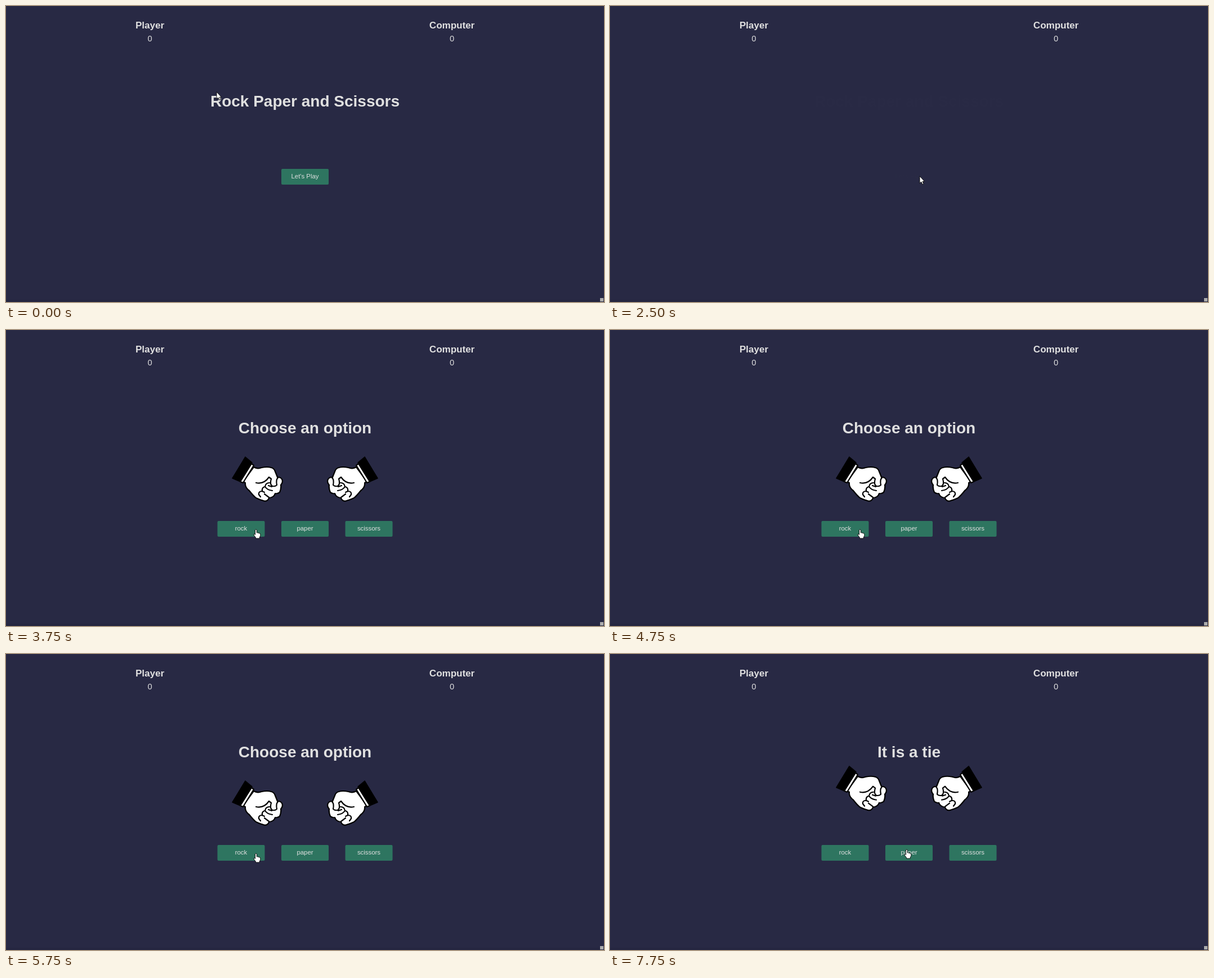
Recreate the animation shown at these times as an HTML page. Size 1062 by 527 pixels, loop 8 s.

```html
<!DOCTYPE html>
<html lang="en">
<head>
<meta charset="utf-8">
<title>Rock Paper and Scissors</title>
<style>
  html, body { margin: 0; height: 100%; overflow: hidden; background: #282944; }
  svg { display: block; width: 100vw; height: 100vh; }
  text { font-family: "Liberation Sans", Arial, sans-serif; fill: #e0e0e0; text-anchor: middle; }
  .name { font-size: 17px; font-weight: bold; }
  .score { font-size: 14.5px; }
  .title { font-size: 28px; font-weight: bold; }
  .button rect { fill: #2e7560; }
  .button text { font-size: 11.4px; }
  .ink { stroke: #000; stroke-width: 2.2; stroke-linecap: round; stroke-linejoin: round; }
  .cursor { fill: #fff; stroke: #000; stroke-width: .9; stroke-linejoin: round; }
</style>
</head>
<body>
<svg viewBox="0 0 1062 527">
  <defs>
    <g id="fist" class="ink" fill="none">
      <path fill="#fff" d="M440 244Q446 248 454 245Q464 243 471 245Q476 246 478 252L482 262Q489 262 490.500 267Q492 272 488 276Q489 282 486 289Q482 292 478 291Q476 298 467 299Q465 305 459 304.500Q450 302 444 299Q439 295 432 286Q424 280 425 272L421 270Z"/>
      <path fill="#fff" d="M436 238L440 241L421 272L416 270Z"/>
      <path fill="#000" stroke-width="1.500" d="M425 226L437 236L416 270L402 264Z"/>
      <path d="M444 272Q458 275 467 262L471 265Q468 275 473 278Q478 279 481 276Q479 266 483 263"/>
      <path d="M468 272Q461 272 460 279Q464 285 473 286M460 279Q454 280 455 287Q448 287 449 293L452 297M455 287L459 289M459 292L467 298M466 277L472 279"/>
    </g>
  </defs>

  <rect y="523" width="1062" height="4" fill="#252640"/>
  <rect x="1055" y="520" width="6" height="6" fill="#adadad"/>

  <text class="name" x="255.500" y="40">Player</text>
  <text class="score" x="255.500" y="63">0</text>
  <text class="name" x="792" y="40">Computer</text>
  <text class="score" x="792" y="63">0</text>

  <g id="intro">
    <text class="title" x="531" y="179">Rock Paper and Scissors</text>
  </g>
  <g id="match">
    <text class="title" id="result" x="531" y="183.500"></text>
    <g id="hands">
      <use href="#fist"/>
      <use href="#fist" transform="translate(1062) scale(-1 1)"/>
    </g>
  </g>

  <g id="cursor" class="cursor">
    <path id="arrow" d="M0 0V12.500L2.800 10L4.800 14.500L6.900 13.600L5 9.300H8.600Z"/>
    <path id="pointer" d="M-1.500 1Q0 -1 1.300 1V6Q3 5 3.800 6.500Q5.500 5.700 6 7.200Q7.800 6.800 7.800 8.500V11.500L6.300 14V16H-.500V14.500L-4 10Q-4.500 7.500 -2.500 8.500L-1.500 9.500Z"/>
  </g>
</svg>
<script>
const LOOP = 8000, STEP = 250;
const FADE = 500, PLAY_CLICK = 2030;
const SHAKE = 2000, LIFT = 26.7;
const ROCK_CLICK = 4250, PAPER_CLICK = 7500, RESULT = 6500;
const SHAKE_STOPS = [0, .15, .25, .35, .5, .65, .75, .85, 1];
const OPTIONS = { rock: 417.5, paper: 531, scissors: 644.5 };

// Pointer route: time, x, y
const ROUTE = [
  [0, 374, 153], [250, 290, 130], [500, 420, 68], [750, 707, 150],
  [1000, 620, 260], [1250, 530, 289], [1500, 542, 298], [1750, 548, 301],
  [2000, 550, 303], [2750, 550, 303], [3000, 530, 316], [3250, 482, 341],
  [3500, 449, 358], [3750, 444, 355], [6750, 444, 355], [7000, 462, 352],
  [7250, 510, 349], [7500, 527, 348], [LOOP, 527, 348]
];

const $ = id => document.getElementById(id);
const clamp = v => Math.min(1, Math.max(0, v));

function addButton(parent, label, x, y) {
  parent.insertAdjacentHTML('beforeend', `<g class="button">
    <rect x="${x - 42}" y="${y}" width="84" height="28" rx="2"/>
    <text x="${x}" y="${y + 17.3}">${label}</text></g>`);
}

// The CSS "ease" curve, cubic-bezier(.25, .1, .25, 1)
function ease(progress) {
  const x = clamp(progress);
  let low = 0, high = 1;
  for (let i = 0; i < 24; i++) {
    const s = (low + high) / 2;
    if (.75 * s * (1 - s) + s ** 3 < x) low = s; else high = s;
  }
  return .3 * low * (1 - low) ** 2 + 3 * low * low * (1 - low) + low ** 3;
}

function shakeOffset(elapsed) {
  const p = elapsed / SHAKE;
  if (p <= 0 || p >= 1) return 0;
  const i = SHAKE_STOPS.findIndex(stop => stop > p) - 1;
  const e = ease((p - SHAKE_STOPS[i]) / (SHAKE_STOPS[i + 1] - SHAKE_STOPS[i]));
  return -LIFT * (i % 2 ? 1 - e : e);
}

function pointerAt(t) {
  const i = ROUTE.findIndex(([time]) => time > t);
  const [t0, x0, y0] = ROUTE[i - 1], [t1, x1, y1] = ROUTE[i];
  const k = (t - t0) / (t1 - t0);
  return [x0 + (x1 - x0) * k, y0 + (y1 - y0) * k];
}

function draw(t) {
  $('intro').setAttribute('opacity', 1 - ease((t - PLAY_CLICK) / FADE));
  $('match').setAttribute('opacity', ease((t - PLAY_CLICK - FADE) / FADE));
  $('result').textContent = t < RESULT ? 'Choose an option' : 'It is a tie';

  const lift = shakeOffset(t - ROCK_CLICK) + shakeOffset(t - PAPER_CLICK);
  $('hands').setAttribute('transform', `translate(0 ${lift})`);

  const [x, y] = pointerAt(t);
  const onOption = y > 340 && y < 368 &&
    Object.values(OPTIONS).some(center => Math.abs(x - center) < 42);
  $('cursor').setAttribute('transform', `translate(${x} ${y})`);
  $('arrow').style.display = onOption ? 'none' : '';
  $('pointer').style.display = onOption ? '' : 'none';
}

addButton($('intro'), "Let's Play", 531, 290);
for (const [label, x] of Object.entries(OPTIONS)) addButton($('match'), label, x, 340);

const start = performance.now();
function tick() {
  const t = (performance.now() - start) % LOOP;
  draw(Math.floor(t / STEP) * STEP);
  requestAnimationFrame(tick);
}
tick();
</script>
</body>
</html>
```
